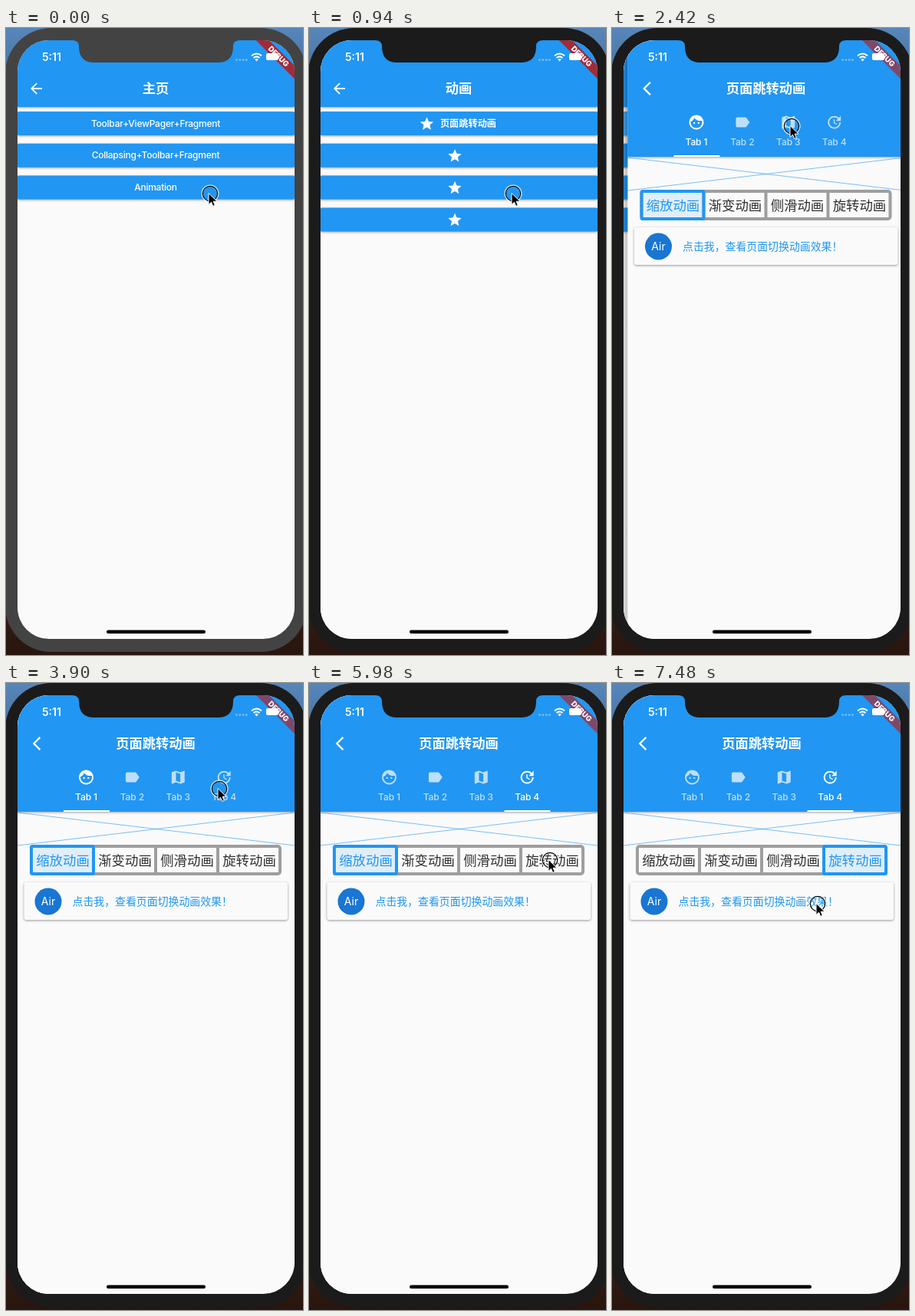
These frames come from a looping animation (387 by 818 pixels, 8000 ms). An HTML page:

```html
<!DOCTYPE html>
<html lang="zh">
<head>
<meta charset="utf-8">
<style>
html, body { margin: 0; height: 100%; overflow: hidden; background: #222; }
svg { display: block; width: 100vw; height: 100vh; }
text { font-family: Inter, "Noto Sans CJK SC", "Noto Sans CJK", sans-serif; fill: #fff; }
.bar { fill: #2196f3; filter: drop-shadow(0 1.5px 1.5px rgba(0,0,0,.36)); }
.card { fill: #fafafa; filter: drop-shadow(0 1.5px 1.5px rgba(0,0,0,.4)); }
</style>
</head>
<body>
<svg id="stage" viewBox="0 0 387 818" preserveAspectRatio="none"></svg>
<script>
const ICONS = {
  back: 'M20 11H7.83l5.59-5.59L12 4l-8 8 8 8 1.41-1.41L7.83 13H20v-2z',
  chevron: 'M11.67 3.87L9.9 2.1 0 12l9.9 9.9 1.77-1.77L3.54 12z',
  star: 'M12 17.27L18.18 21l-1.64-7.03L22 9.24l-7.19-.61L12 2 9.19 8.63 2 9.24l5.46 4.73L5.82 21z',
  face: 'M9 11.75a1.25 1.25 0 1 0 0 2.5 1.25 1.25 0 0 0 0-2.5zm6 0a1.25 1.25 0 1 0 0 2.5 1.25 1.25 0 0 0 0-2.5zM12 2C6.48 2 2 6.48 2 12s4.48 10 10 10 10-4.48 10-10S17.52 2 12 2zm0 18c-4.41 0-8-3.59-8-8 0-.29.02-.58.05-.86 2.36-1.05 4.23-2.98 5.21-5.37C11.07 8.33 14.05 10 17.42 10c.78 0 1.53-.09 2.25-.26.21.71.33 1.47.33 2.26 0 4.41-3.59 8-8 8z',
  label: 'M17.63 5.84C17.27 5.33 16.67 5 16 5H5C3.9 5 3 5.9 3 7v10c0 1.1.9 2 2 2h11c.67 0 1.27-.33 1.63-.84L22 12z',
  map: 'M20.5 3l-.16.03L15 5.1 9 3 3.36 4.9c-.21.07-.36.25-.36.48V20.5c0 .28.22.5.5.5l.16-.03L9 18.9l6 2.1 5.64-1.9c.21-.07.36-.25.36-.48V3.5c0-.28-.22-.5-.5-.5zM15 19l-6-2.11V5l6 2.11V19z',
  update: 'M21 10.12h-6.78l2.74-2.82c-2.73-2.7-7.15-2.8-9.88-.1-2.73 2.71-2.73 7.08 0 9.79 2.73 2.71 7.15 2.71 9.88 0C18.32 15.65 19 14.08 19 12.1h2c0 1.98-.88 4.55-2.64 6.29-3.51 3.48-9.21 3.48-12.72 0-3.5-3.47-3.53-9.11-.02-12.58 3.51-3.47 9.14-3.47 12.65 0L21 3v7.12zM12.5 8v4.25l3.5 2.08-.72 1.21L11 13V8h1.5z'
};
const icon = (name, x, y, scale) =>
  `<path d="${ICONS[name]}" fill="#fff" transform="translate(${x} ${y}) scale(${scale}) translate(-12 -12)"/>`;
const text = (s, x, y, size, attrs = '') =>
  `<text x="${x}" y="${y + size * .36}" font-size="${size}" text-anchor="middle" ${attrs}>${s}</text>`;
const rect = (x, y, w, h, attrs = '') =>
  `<rect x="${x}" y="${y}" width="${w}" height="${h}" ${attrs}/>`;

const rowY = i => 109 + 41.8 * i;
const button = (i, content) => rect(15, rowY(i), 361, 31, 'class="bar" rx="1.5"') + content;
const press = (id, i) =>
  `<g id="${id}" clip-path="url(#row${i})">${rect(15, rowY(i), 361, 31, 'fill="#fff" opacity=".16"')}
   <circle fill="#fff" opacity=".14"/></g>`;
const page = (id, barHeight, title, body) =>
  `<g id="${id}">${rect(0, 16, 15, 782, 'fill="url(#edge)"')}${rect(15, 16, 361, 782, 'fill="#fafafa"')}
   ${rect(15, 16, 361, barHeight, 'class="bar"')}${text(title, 195, 79, 17.3, 'font-weight="600"')}${body}</g>`;

const banner = `<g transform="translate(376 16) rotate(45)">
  ${rect(-42, 23.5, 84, 12, 'fill="#b71c1c" opacity=".63"')}
  ${text('DEBUG', 0, 29.5, 9.6, 'font-weight="800"')}</g>`;

const label = s => text(s, 195, 0, 12, 'font-weight="500" letter-spacing="-.24"');
const home = page('home', 87, '主页', icon('back', 39.5, 79, .94) +
  ['Toolbar+ViewPager+Fragment', 'Collapsing+Toolbar+Fragment', 'Animation']
    .map((s, i) => button(i, `<g transform="translate(0 ${rowY(i) + 15.3})">${label(s)}</g>`)).join('') +
  press('homePress', 2));

const list = page('list', 87, '动画', icon('back', 39.5, 79, .94) +
  [0, 1, 2, 3].map(i => button(i, icon('star', i ? 190 : 153.5, rowY(i) + 15.9, .87))).join('') +
  text('页面跳转动画', 207.5, 124.8, 12.2, 'font-weight="600"') + press('listPress', 0));

const tabX = i => 104.5 + 59.9 * i;
const tabs = ['face', 'label', 'map', 'update'].map((name, i) =>
  `<g class="tab">${icon(name, tabX(i), 123, .94)}
   ${text('Tab ' + (i + 1), tabX(i), 149, 12, 'font-weight="500" letter-spacing="-.1"')}</g>`).join('');
const choices = ['缩放动画', '渐变动画', '侧滑动画', '旋转动画'].map((s, i) =>
  text(s, 74 + 81 * i, 231.5, 17.4, 'class="choice"')).join('');
const detail = page('detail', 152, '页面跳转动画', icon('chevron', 45.5, 79, .9) + tabs +
  rect(0, 166, 60, 2, 'id="indicator" fill="#fff"') +
  '<circle id="tabSplash" cx="278" cy="138" r="26" fill="#fff" opacity=".14"/>' +
  '<path d="M15 169L376 212M15 212L376 169" stroke="#2196f3" stroke-width=".6"/>' +
  `<g fill="none" stroke="#9e9e9e" stroke-width="4">${rect(33, 213, 324, 36, 'rx="3"')}
   <path d="M114 213v36m81 0v-36m81 0v36"/></g>` +
  rect(0, 213, 81, 36, 'id="choiceBox" rx="1.5" fill="#2196f3" fill-opacity=".12" stroke="#2196f3" stroke-width="4"') +
  choices + rect(23.5, 260, 343.5, 49, 'class="card" rx="3"') +
  '<circle cx="55" cy="285" r="17.5" fill="#1976d2"/>' + text('Air', 55, 285, 14) +
  '<text x="86.5" y="290" font-size="13.9" style="fill:#2196f3">点击我，查看页面切换动画效果！</text>');

const status = `<text x="47" y="43" font-size="14" font-weight="600">5:11</text>
  <g fill="#fff" opacity=".35">${[0, 1, 2, 3].map(i => `<circle cx="${300.5 + 4.3 * i}" cy="41.5" r="1.5"/>`).join('')}</g>
  <g fill="none" stroke="#fff" stroke-width="2"><path d="M320 36.2q6.5-5.4 13 0M322.5 39q4-3.2 8 0"/></g>
  <path d="M324.2 41q2.3-1.8 4.6 0l-2.3 2.4z" fill="#fff"/>
  ${rect(339, 33, 16, 9, 'rx="2" fill="#fff"')}`;

const stage = document.getElementById('stage');
stage.innerHTML = `<defs>
  <linearGradient id="desk" x2="0" y2="1"><stop stop-color="#5886ba"/><stop offset=".12" stop-color="#3f6794"/>
    <stop offset=".88" stop-color="#3a2118"/><stop offset="1" stop-color="#28150e"/></linearGradient>
  <linearGradient id="edge"><stop stop-opacity="0"/><stop offset="1" stop-opacity=".22"/></linearGradient>
  <clipPath id="screen">${rect(15, 16, 361, 781, 'rx="41"')}</clipPath>
  ${[0, 2].map(i => `<clipPath id="row${i}">${rect(15, rowY(i), 361, 31)}</clipPath>`).join('')}</defs>
  ${rect(0, 0, 387, 818, 'fill="url(#desk)"')}
  <g id="bezel">${rect(-1, 0, 393, 814, 'rx="60"')}</g>
  <g clip-path="url(#screen)"><g id="under">${home}${list}${banner}</g>${detail}${banner}${status}
    ${rect(131, 785.5, 129, 4.5, 'rx="2.2"')}</g>
  <path id="notch" d="M86 15H305V16Q296 16 296 25T276 45H115Q95 45 95 25T86 16Z"/>
  <g id="cursor"><circle r="10.3" fill="none" stroke="#fff" stroke-width="2.4" opacity=".8"/>
    <circle r="9.7" fill="none" stroke="#000" stroke-width="1.2"/>
    <path d="M-2-.5V14.5L1.5 11.2 3.7 16.4 6.3 15.3 4.1 10.2H9Z" stroke="#fff" stroke-width="1"/></g>`;
const $ = id => document.getElementById(id);
$('notch').setAttribute('d', 'M86 15H305V16Q296 16 296 24Q296 45 276 45H115Q95 45 95 24Q95 16 86 16Z');

// Progress 0..1 in n held steps: the first lands on start, the last on end.
const step = (t, start, end, n) =>
  Math.max(0, Math.min(n, Math.floor((t - start) * (n - 1) / (end - start) + 1.05))) / n;
const move = (id, x, y = 0) => $(id).setAttribute('transform', `translate(${x} ${y})`);
const show = (id, on) => $(id).style.display = on ? '' : 'none';

const TRACKS = [
  [1240, 1680, 4, [[266, 216], [234, 128]]],
  [2860, 3900, 8, [[234, 128], [203, 182], [151, 247], [196, 206], [278, 138]]],
  [5240, 5980, 6, [[278, 138], [314, 231]]],
  [6880, 7480, 5, [[314, 231], [268, 288]]]
];
function cursorAt(t) {
  const [start, end, n, points] = TRACKS.filter(k => t >= k[0]).pop() || TRACKS[0];
  const p = step(t, start, end, n) * (points.length - 1);
  const i = Math.min(Math.floor(p), points.length - 2);
  return [0, 1].map(a => points[i][a] + (points[i + 1][a] - points[i][a]) * (p - i));
}

function slide(top, below, p) {
  const x = 361 * (1 - p) ** 3.81;
  show(top, p > 0);
  move(top, x);
  move(below, (x - 361) / 3);
}

function splash(id, on, x, y, r) {
  show(id, on);
  const c = $(id).querySelector('circle');
  c.setAttribute('cx', x);
  c.setAttribute('cy', y);
  c.setAttribute('r', r);
}

function draw(t) {
  const shell = t < 500 ? '#434343' : '#1b1b1b';
  $('bezel').style.fill = $('notch').style.fill = shell;
  slide('list', 'home', step(t, 790, 940, 2));
  slide('detail', 'under', step(t, 2270, 2570, 3));
  splash('homePress', t >= 500 && t < 940, 266, 216, 24);
  splash('listPress', t >= 1980 && t < 2570, 235, 128, t < 2130 ? 24 : 64);

  const tabMove = step(t, 4200, 4340, 2);
  $('indicator').setAttribute('x', 75 + 179.5 * tabMove);
  show('tabSplash', t >= 4050 && t < 4340);
  document.querySelectorAll('.tab').forEach((el, i) => {
    const active = i === 0 ? 1 - tabMove : i === 3 ? tabMove : 0;
    el.style.opacity = .7 + .3 * active;
  });

  const chosen = t < 6130 ? 0 : 3;
  $('choiceBox').setAttribute('x', 33 + 81 * chosen);
  document.querySelectorAll('.choice').forEach((el, i) =>
    el.style.fill = i === chosen ? '#2196f3' : '#303030');
  move('cursor', ...cursorAt(t));
}

function loop() {
  draw(performance.now() % 8000);
  requestAnimationFrame(loop);
}
loop();
</script>
</body>
</html>
```
